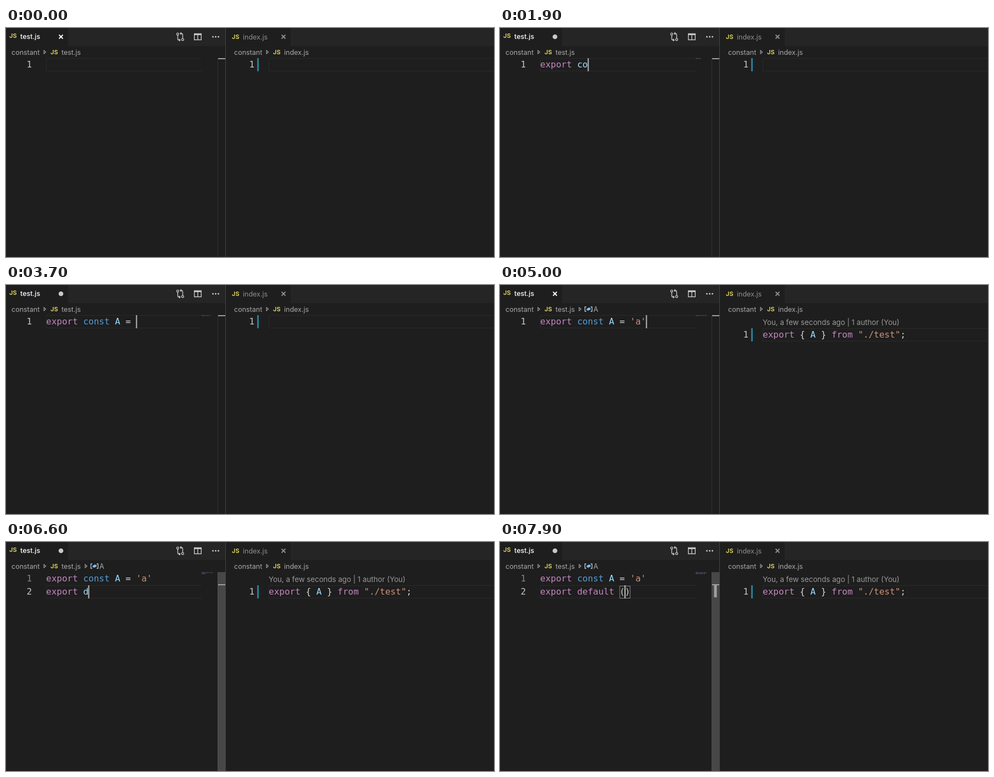
An HTML page for the animation above (8 s loop, 888 by 418 pixels).

```html
<!DOCTYPE html>
<html lang="en">
<head>
<meta charset="utf-8">
<title>Editor typing</title>
<style>
html, body { margin: 0; width: 100%; height: 100%; overflow: hidden; background: #1e1e1e; }
svg { display: block; width: 888px; height: 418px; }
text { white-space: pre; }
.code { font: 16px "DejaVu Sans Mono", monospace; }
.ui { font: 12.5px Inter, sans-serif; }
.js { font: 600 11px Inter, sans-serif; fill: #e6db62; }
.lens { font: 13.3px Inter, sans-serif; fill: #999; }
</style>
</head>
<body>
<svg id="stage" viewBox="0 0 888 418" xmlns="http://www.w3.org/2000/svg"></svg>
<script>
const LOOP = 8000, CH = 9.632, ROW = 24, TOP = 55;
const stage = document.getElementById('stage');

const rect = (x, y, w, h, fill, extra = '') =>
  `<rect x="${x}" y="${y}" width="${w}" height="${h}" fill="${fill}" ${extra}/>`;
const text = (x, y, str, cls, fill) =>
  `<text x="${x}" y="${y}" class="${cls}" ${fill ? `fill="${fill}"` : ''}>${str}</text>`;
const line = (d, stroke, w = 1, extra = '') =>
  `<path d="${d}" fill="none" stroke="${stroke}" stroke-width="${w}" ${extra}/>`;
const span = (str, fill, bold) =>
  `<tspan fill="${fill}"${bold ? ' font-weight="bold"' : ''}>${str}</tspan>`;

function tokenColor(tok) {
  if (/^(export|from|default)$/.test(tok)) return '#c586c0';
  if (tok === 'const') return '#569cd6';
  if (/^['"]/.test(tok)) return '#ce9178';
  return /^\w/.test(tok) ? '#9cdcfe' : '#d4d4d4';
}
const tokens = str => str.match(/'[^']*'|"[^"]*"|\w+|\s+|[^\w\s'"]+/g) || [];
const code = (x, y, str) =>
  text(x, y, tokens(str).map(t => span(t, tokenColor(t))).join(''), 'code');

// Completion icons, drawn around their centre
const icons = {
  k: line('M-7-4.5h5M0-4.5h6M-7-1.5h5M0-1.5h3M-7 1.5h10M-7 4.5h4M-1 4.5h7', '#c5c5c5', 1.4),
  v: line('M-4-4h-2.5v8h2.5M4-4h2.5v8h-2.5', '#c5c5c5', 1.3) +
     '<path d="M-3.5-.5L1-3l3 1.5v2L-.5 3l-3-1.5z" fill="#75beff"/>',
  s: line('M-5.5 5v-10.5h11v10.5', '#c5c5c5', 1.3) +
     line('M-6 5.5h13', '#c5c5c5', 1.5, 'stroke-dasharray="1.5 1.3"'),
  m: line('M0-6L5.5-3v6L0 6L-5.5 3v-6zM-5.5-3L0 0L5.5-3M0 0v6', '#b180d7', 1.2),
  c: '<path d="M-6.5-1L-2-5.5L1-2.5L-3.5 2zM2.5-2L5-4.5L7-2.5L4.5 0zM2.5 4L5 1.5L7 3.5L4.5 6z" fill="#ee9d28"/>' +
     line('M-1-1h5M1-1v5h3', '#ee9d28', 1.2)
};
const icon = (kind, x, y) => `<g transform="translate(${x} ${y})">${icons[kind]}</g>`;

// Each entry is an icon letter, a colon and a label
const list = str => str.split(' ').map(s => s.split(':'));
const exList = list('k:export v:exports k:extends v:external s:exa s:exd s:exp s:expgql m:exec m:exec m:execFile m:execFileSync');
const expList = list('s:exp k:export v:exports s:expgql m:__exportStar v:RegExp v:XPathExpression c:AST_ClassExpression c:AST_Expansion c:AST_Export c:AST_RegExp c:AST_SymbolExport');
const conList = list('k:const v:console m:constructor s:cons v:constants m:construct c:AST_Const c:AST_Constant m:isConstant c:AST_SymbolConst v:ConstantSourceNode v:ReadonlyConst');
const deList = list('k:default k:debugger k:delete m:decodeURI m:decodeURIComponent m:defineProperty s:dec s:def m:deepEqual m:deflate m:deflateSync v:DeviceMotionEvent');

function suggestions(word) {
  if (word === 'A') return { items: list('v:A'), ratio: 1 };
  const source = word.length < 3 && word[0] === 'e' ? exList
    : word[0] === 'e' ? expList : word[0] === 'c' ? conList : deList;
  const items = source.filter(([, name]) => name.toLowerCase().includes(word));
  return { items, ratio: items.length < 12 ? 1 : source === expList ? 0.706 : 0.245 };
}

function popup(x, y, word) {
  const { items, ratio } = suggestions(word);
  const h = items.length * ROW;
  let out = rect(x + .5, y + .5, 429, h - .5, '#252526', 'stroke="#454545"') +
    rect(x + 1, y + 1, 428, ROW - 1, '#062f4a');
  if (ratio < 1) out += rect(x + 419, y + 1, 10, h * ratio, '#797979', 'opacity=".4"');
  items.forEach(([kind, name], i) => {
    const cy = y + i * ROW + 12.5;
    const at = name.toLowerCase().indexOf(word.toLowerCase()), end = at + word.length;
    out += icon(kind, x + 14, cy) + text(x + 25, cy + 5.5,
      span(name.slice(0, at), '#d4d4d4') + span(name.slice(at, end), '#3a9df3', true) +
      span(name.slice(end), '#d4d4d4'), 'code');
    if (name === 'exp' && i === 0) {
      out += text(x + 67, cy + 5.5, 'exportDefault (ES7 React/Redux/Gr…', 'code', '#a4b1bb') +
        `<circle cx="${x + 407}" cy="${cy}" r="6.5" fill="#4b96cc"/>` +
        line(`M${x + 407} ${cy - 3.7}v1.7m0 1.2v4.5`, '#16364d', 1.6);
    }
  });
  return out;
}

// Time, typed text ("|" marks a caret inside the text), suggestions open
const first = "export const A = 'a'\n";
const steps = [
  [0, ''], [500, 'e'], [600, 'e', 1], [800, 'ex', 1], [1000, 'exp', 1], [1100, 'expo', 1],
  [1300, 'expor', 1], [1400, 'export', 1], [1600, 'export '], [1800, 'export c'],
  [1900, 'export co'], [2000, 'export con', 1], [2200, 'export cons', 1], [2300, 'export const', 1],
  [2700, 'export const '], [3000, 'export const A'], [3100, 'export const A', 1],
  [3300, 'export const A '], [3500, 'export const A ='], [3600, 'export const A = '],
  [3800, "export const A = '|'"], [4000, "export const A = 'a|'"], [4200, "export const A = 'a'"],
  [5100, first], [5400, first + 'e'], [5500, first + 'ex', 1], [5700, first + 'exp', 1],
  [5900, first + 'expo', 1], [6000, first + 'expor', 1], [6200, first + 'export', 1],
  [6400, first + 'export '], [6600, first + 'export d'], [6700, first + 'export de', 1],
  [6900, first + 'export def', 1], [7000, first + 'export defa', 1], [7100, first + 'export defau', 1],
  [7200, first + 'export defaul', 1], [7300, first + 'export default', 1],
  [7500, first + 'export default '], [7700, first + 'export default (|)']
];

const jsIcon = (x, y) => text(x, y, 'JS', 'js');
const arrow = x => line(`M${x} 41l3.5 3l-3.5 3z`, '#a0a0a0', 1.1);
const cross = (x, color) => line(`M${x - 3.5} 12.5l7 7m0-7l-7 7`, color, 1.8);
const crumbs = (x, file) => text(x, 49, 'constant', 'ui', '#a9a9a9') + arrow(x + 59) +
  jsIcon(x + 71, 48) + text(x + 91, 49, file, 'ui', '#a9a9a9');

const chrome = rect(0, 0, 888, 418, '#1e1e1e') +
  rect(113, 0, 286, 33, '#252526') + rect(518, 0, 370, 33, '#252526') +
  jsIcon(6, 18) + `<text x="26" y="20" class="ui" fill="#fff" font-weight="500" style="font-weight:500">test.js</text>` +
  jsIcon(411, 19.5) + text(431, 20.5, 'index.js', 'ui', '#8f8f8f') + cross(505, '#909090') +
  crumbs(10, 'test.js') + crumbs(415, 'index.js') +
  line('M312.5 13v6.5q0 2.5 2.5 2.5h2m-2-2l2 2l-2 2M321.5 19v-6.5q0-2.5-2.5-2.5h-2m2-2l-2 2l2 2', '#c5c5c5', 1.4) +
  '<g fill="#252526" stroke="#c5c5c5" stroke-width="1.3"><circle cx="312.5" cy="11" r="1.9"/><circle cx="321.5" cy="21" r="1.9"/></g>' +
  line('M342.7 10.5h12.6v11h-12.6zM349 10.5v11', '#c5c5c5', 1.4) + rect(342, 10, 14, 3, '#c5c5c5') +
  [376.5, 381.5, 386.5].map(x => `<circle cx="${x}" cy="16" r="1.5" fill="#c5c5c5"/>`).join('');

function minimap(lines) {
  return lines.map((str, row) => {
    let col = 0;
    return tokens(str).map(t => {
      const bar = t.trim() ? rect(356 + col, TOP + row * 2, t.length, 1.3, tokenColor(t), 'opacity=".4"') : '';
      col += t.length;
      return bar;
    }).join('');
  }).join('');
}

function leftEditor(t, typed, open) {
  const lines = typed.replace('|', '').split('\n');
  const row = lines.length - 1, y = TOP + row * ROW;
  const current = typed.split('\n')[row];
  const col = current.includes('|') ? current.indexOf('|') : current.length;
  const caretX = 73 + col * CH;
  const brackets = current.includes('(');
  let out = line(`M356 ${y + .5}H73.5v23H356`, '#2a2a2a') + line('M385.5 55V418', '#303030');

  if (row) out += rect(385, TOP, 14, 363, '#797979', 'opacity=".45"');
  out += rect(386, row ? 77 : 55, 13, 2, '#a0a0a0');
  if (brackets) out += rect(389.5, 79, 5, 22, '#a0a0a0');
  lines.forEach((str, i) => {
    const base = TOP + i * ROW + 17;
    out += text(37.5, base, i + 1, 'code', i === row ? '#c6c6c6' : '#858585') + code(73, base, str);
  });
  if (brackets) {
    for (const x of [caretX - CH, caretX]) {
      out += rect(x + .5, y + 1.5, CH - .5, 22, 'none', 'stroke="#888"');
    }
  }
  out += minimap(lines);
  if (t >= 300) out += rect(Math.round(caretX) - .5, y, 2, ROW, '#b8b9b7');

  const saved = t < 500 || (t >= 4500 && t < 5100);
  out += saved ? cross(100, '#fff') : '<circle cx="100" cy="16" r="4.3" fill="#c8c8c8"/>';
  if (t >= 4300) out += arrow(144) + icon('v', 161, 44) + text(170, 49, 'A', 'ui', '#a9a9a9');
  return { out, menu: open ? popup(Math.round(caretX - .3), y + ROW, current.match(/\w+$/)[0]) : '' };
}

function rightEditor(t) {
  const lens = t >= 4900, y = TOP + (lens ? ROW : 0);
  return rect(399, 0, 1, 418, '#444') +
    line(`M888 ${y + .5}H478.5v23H888`, '#2a2a2a') +
    text(442.5, y + 17, '1', 'code', '#c6c6c6') + rect(457, y, 3, ROW, '#2b7d98') +
    (lens ? text(478, 73, 'You, a few seconds ago | 1 author (You)', 'lens') : '') +
    (t >= 4700 ? code(478, y + 17, 'export { A } from "./test";') : '');
}

let shown = '';
function draw(t) {
  const [, typed, open] = steps.filter(s => s[0] <= t).pop();
  const left = leftEditor(t, typed, open);
  const picture = chrome + left.out + rightEditor(t) + left.menu;
  if (picture !== shown) stage.innerHTML = shown = picture;
}

function tick() {
  draw(performance.now() % LOOP);
  requestAnimationFrame(tick);
}
tick();
</script>
</body>
</html>
```
